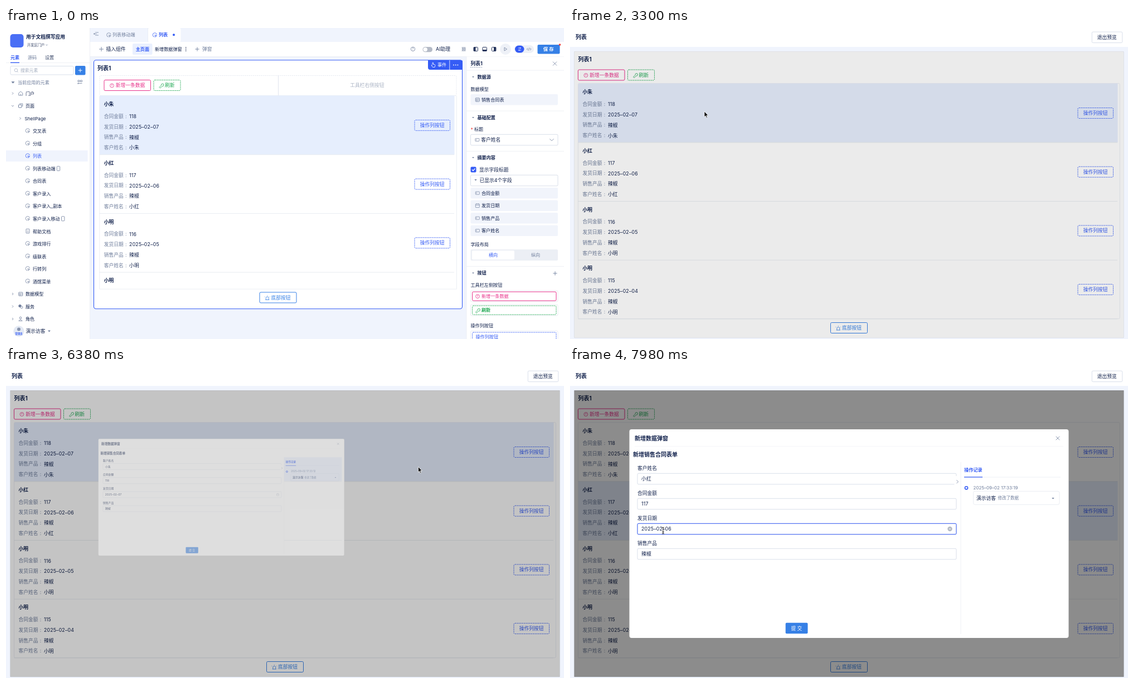
Animation, 1001 px wide and 559 px high, one loop 8 s. Source, as an HTML page:

```html
<!DOCTYPE html>
<html lang="zh-CN">
<head>
<meta charset="utf-8">
<style>
html, body { margin: 0; width: 100%; height: 100%; overflow: hidden; background: #fff }
svg { display: block; font-family: Inter, 'Noto Sans CJK SC', 'Noto Sans CJK', sans-serif }
text { white-space: pre }
</style>
</head>
<body>
<svg id="stage" width="1001" height="559" viewBox="0 0 1001 559"></svg>
<script>
const INK = '#10204b', GREY = '#6f7e9c', BLUE = '#355cf5', SKY = '#3680e6', PINK = '#e8318a',
  GREEN = '#1aa64f', EDGE = '#d9dfea', FAINT = '#eaedf3', PALE = '#f1f4fb', BACK = '#f0f4fd', PICK = '#e6eefd';
const ACCOUNT = '演示访客';

// Drawing helpers; y of text is its vertical middle
const text = (x, y, s, size = 8.125, color = INK, weight = 400, more = '') =>
  `<text x="${x}" y="${y + size * .365}" font-size="${size}" fill="${color}" font-weight="${weight}" ${more}>${s}</text>`;
const rect = (x, y, w, h, fill = 'none', stroke = 'none', r = 2, more = '') =>
  `<rect x="${x}" y="${y}" width="${w}" height="${h}" rx="${r}" fill="${fill}" stroke="${stroke}" ${more}/>`;
const path = (d, color = GREY, width = .8, fill = 'none', more = '') =>
  `<path d="${d}" stroke="${color}" stroke-width="${width}" fill="${fill}" ${more}/>`;
const dot = (x, y, r, fill, stroke = 'none', width = .8) =>
  `<circle cx="${x}" cy="${y}" r="${r}" fill="${fill}" stroke="${stroke}" stroke-width="${width}"/>`;
const group = (id, body, more = '') => `<g id="${id}" ${more}>${body}</g>`;
const line = (x1, y1, x2, y2, color = FAINT, width = .8) => path(`M${x1} ${y1}L${x2} ${y2}`, color, width);
const plus = (x, y, r, color = GREY) => path(`M${x - r} ${y}h${2 * r}M${x} ${y - r}v${2 * r}`, color, .9);
const cross = (x, y, r) => path(`M${x - r} ${y - r}l${2 * r} ${2 * r}m0 ${-2 * r}l${-2 * r} ${2 * r}`, GREY, .8);
const right = (x, y, r = 2) => path(`M${x - r / 2} ${y - r}l${r} ${r}l${-r} ${r}`);
const down = (x, y, r = 2) => path(`M${x - r} ${y - r / 2}l${r} ${r}l${r} ${-r}`);
const wedge = (x, y, r = 2) => path(`M${x - r} ${y - r / 2}h${2 * r}l${-r} ${r * 1.2}z`, 'none', 0, GREY);
const DASH = 'stroke-dasharray="2.1 1.1" stroke-width=".9"';
const WIDE = 'letter-spacing=".2"';

const powerIcon = (x, y) => dot(x, y, 3.4, 'none', PINK) + line(x, y - 2.2, x, y + .6, PINK);
const toolIcon = (x, y) => path(`M${x - 3.5} ${y + 3.5}l3.6 -3.6a2.2 2.2 0 1 1 1.6 1.6l-3.6 3.6z`, GREEN);
const bellIcon = (x, y) => path(`M${x - 3.5} ${y + 3}h7M${x - 2.5} ${y + 3}v-3a2.5 2.5 0 0 1 5 0v3M${x} ${y - 4}v-1M${x - 4} ${y - 2}l-.8 -.8M${x + 4} ${y - 2}l.8 -.8`, SKY);
const pageIcon = (x, y, c = GREY) => path(`M${x + 3.6} ${y - .5}a3.7 3.7 0 1 0 -4 4.1M${x} ${y}l3.8 1.3l-1.8 .7l-.7 1.8z`, c, .75);
const boxIcon = (x, y) => rect(x - 3.5, y - 2.5, 7, 5, 'none', GREY, .6, 'stroke-width=".7"') + line(x - 1.7, y - 1, x - 1.7, y + 1, GREY);
const gridIcon = (x, y) => rect(x - 3.5, y - 3, 7, 6.4, 'none', GREY, .6, 'stroke-width=".8"') +
  path(`M${x - 3.5} ${y - .9}h7M${x - 3.5} ${y + 1.2}h7M${x - 1} ${y - 1}v4.3`, GREY, .6);
const dateIcon = (x, y) => rect(x - 3.5, y - 3, 7, 6.4, 'none', GREY, .6, 'stroke-width=".7"') +
  path(`M${x - 3.5} ${y - .7}h7M${x - 1.5} ${y - 4}v2M${x + 1.5} ${y - 4}v2`, GREY, .6);
const phoneIcon = (x, y) => rect(x - 2.5, y - 4, 5.4, 8, 'none', GREY, 1, 'stroke-width=".8"');

// The record list shared by editor and preview
const PITCH = 105.7;
const records = [['小朱', 118, '07'], ['小红', 117, '06'], ['小明', 116, '05'], ['小明', 115, '04']]
  .map(([name, sum, day]) => ({ name, values: [sum, '2025–02–' + day, '辣椒', name] }));
const labels = ['合同金额', '发货日期', '销售产品', '客户姓名'];

const listHead = (x, y) =>
  rect(x + .5, y + .5, 83.5, 19, 'none', PINK, 2) + powerIcon(x + 14.5, y + 10.5) + text(x + 21.2, y + 10, '新增一条数据', 8.75, PINK) +
  rect(x + 89.5, y + .5, 48, 19, 'none', GREEN, 2, DASH) + toolIcon(x + 103, y + 10) + text(x + 109.5, y + 10, '刷新', 8.75, GREEN, 500);

const listRows = (x, y, width, pick) => {
  const frame = rect(x + .3, y, width, 423, 'none', FAINT, 2);
  const chosen = rect(x + .5, y, width - 4, 106, PICK, 'none', 0, `id="${pick}"`);
  return frame + chosen + records.map((rec, i) => {
    const top = y + i * PITCH, bx = x + width - 75;
    return text(x + 8.3, top + 15.6, rec.name, 8.75, INK, 700) +
      labels.map((label, k) => {
        const ly = top + 37.2 + k * 18.75;
        return text(x + 8.3, ly, label, 8.75, GREY) + text(x + 46.5, ly, ':', 8.75, GREY) +
          text(x + 53.6, ly + .3, rec.values[k], 8.75, INK, 400, WIDE);
      }).join('') +
      rect(bx, top + 43.9, 63.5, 19, 'none', BLUE, 2, DASH) + text(bx + 9.8, top + 53.2, '操作列按钮', 8.75, BLUE) +
      line(x, top + 106.2, x + width - 4, top + 106.2, '#e3e7ee');
  }).join('');
};
const bottomButton = (x, y) =>
  rect(x + .5, y + .5, 66, 19, '#fff', SKY, 2) + bellIcon(x + 14.3, y + 11) + text(x + 21, y + 10, '底部按钮', 8.75, SKY);

const sidebar = () => {
  const pages = ['交叉表', '分组', '列表', '列表移动端', '合同表', '客户录入', '客户录入_副本', '客户录入移动', '帮助文档', '游戏排行', '级联表', '行转列', '酒馆菜单'];
  let s = rect(0, 0, 150.5, 559, '#fff', 'none', 0) + line(150.5, 0, 150.5, 559) +
    rect(7.5, 11, 24, 24, '#4a6ff5', 'none', 5) +
    text(36, 16, '用于文档撰写应用', 8.75, INK, 700) + text(38, 31, '开发区门户', 6.25, '#3c4a6b') + down(73, 30.5, 1.6) +
    text(8, 53.5, '元素', 8.125, BLUE, 700) + text(39, 53.5, '源码', 8.125, GREY) + text(70, 53.5, '设置', 8.125, '#3c4a6b') +
    line(0, 62.5, 150, 62.5) + line(8, 62.3, 24, 62.3, BLUE, 1.4) +
    rect(8, 68.5, 113, 15.5, '#fff', EDGE) + dot(18, 75.8, 2.8, 'none', '#a9b3c6') + line(20, 78, 21.6, 79.6, '#a9b3c6') +
    text(26, 76, '搜索元素', 7.8, '#a3adbf') + rect(124, 68, 18.5, 16.5, SKY) + plus(133.2, 76.2, 3.4, '#fff') +
    wedge(12.5, 97.7, 3) + text(21, 98, '当前应用的元素', 8.125, GREY) +
    path('M129 94h3v2.6h-3zM133.5 94h3v2.6h-3zM129 99.5h7.5M130 98.5l-1.5 1.2l1.5 1.2', GREY, .8) +
    rect(0, 220, 146.5, 20, BACK, 'none', 0);
  [['门户', 117.5], ['页面', 140], ['数据模型', 478], ['服务', 500.5], ['角色', 523]].forEach(([name, y], i) => {
    s += (i == 1 ? down : right)(12, y, 2) + text(35, y + .3, name, 8.125, INK, 500);
    s += [() => path(`M22.8 ${y - .5}l3.5 -3l3.5 3v4h-7zM26.3 ${y + 1}v2.5`),
      () => rect(22.5, y - 2, 5.5, 5, 'none', GREY, .6) + path(`M24 ${y - 4}h5.8v5`),
      () => gridIcon(26.3, y), () => dot(25, y - 1, 2.6, GREY) + dot(28, y + 1.5, 2, '#fff', GREY),
      () => dot(26, y - 2, 1.8, 'none', GREY) + path(`M22.5 ${y + 3.5}h7M23.5 ${y + 3}q2.5 -4 5 0`)][i]();
  });
  s += right(25.5, 162.5, 2) + text(33.5, 162.7, 'ShellPage', 8.125);
  pages.forEach((name, i) => {
    const y = 185 + i * 22.53, on = i == 2;
    s += (i == 8 ? rect(36, y - 4, 6, 7.6, 'none', GREY, .6, 'stroke-width=".8"') + path(`M37.5 ${y - .5}h3M37.5 ${y + 1.5}h3`, GREY, .6)
      : pageIcon(39, y - .4, on ? BLUE : GREY)) + text(48, y + .3, name, 8.125, on ? BLUE : INK, on ? 500 : 400);
    if (i == 3) s += phoneIcon(93.8, y);
    if (i == 7) s += phoneIcon(102, y);
  });
  return s + rect(0, 533, 150, 26, '#fff', 'none', 0) + dot(23, 545, 9.7, '#e3e9f4') +
    dot(23, 541.5, 3, '#8793ab') + text(16.5, 549.5, '管理员', 4.4, BLUE, 700) +
    text(35.5, 544.8, ACCOUNT, 8.75) + wedge(77.5, 544.8, 2.4);
};

const topBars = () => rect(151, 0, 850, 25, BACK, 'none', 0) + rect(255, 0, 58.5, 25, '#fff', 'none', 2) +
  rect(151, 25, 850, 26.5, '#fff', 'none', 0) + line(151, 51.5, 1001, 51.5) + line(254.5, 0, 254.5, 25) +
  path('M160 8h6M160 13h6M157.5 10.5h5M159 9l-1.7 1.5l1.7 1.5') +
  pageIcon(184.5, 12.5) + text(191, 12.3, '列表移动端', 8.125, GREY) +
  pageIcon(267, 12.5, BLUE) + text(274, 12.3, '列表', 8.125, BLUE, 700) + dot(301, 12.3, 2, BLUE) +
  plus(171, 38, 4) + text(179.5, 38.3, '插入组件', 8.75) +
  rect(227, 28, 35.5, 20, '#eaf0fe') + text(232.7, 38.2, '主页面', 8.125, BLUE, 700) +
  text(267, 38.2, '新增数据弹窗', 8.125) + [35, 38, 41].map(y => dot(322.7, y, .8, INK)).join('') +
  plus(343, 38, 3.6) + text(352, 38.2, '弹窗', 8.75, GREY) +
  dot(730, 37.8, 3.7, 'none', GREY) + text(728.4, 37.8, '?', 5.5, GREY) +
  rect(747.5, 34, 17.5, 9.3, '#b4bac6', 'none', 4.6) + dot(752.2, 38.6, 3.7, '#fff') + text(771, 38.2, 'AI助理', 8.75) +
  path('M817.5 35h7M817.5 41h7M818.5 36.5h2v3h-2zM822 36.5h2v3h-2z') +
  [839, 855, 871.5].map((x, i) => rect(x, 34.5, 7.4, 7, '#fff', '#26355c', 1) +
    [rect(x, 34.5, 3.5, 7, '#26355c', 'none', 0), rect(x, 39, 7.4, 2.5, '#26355c', 'none', 0), rect(x + 3.5, 34.5, 4, 7, '#26355c', 'none', 0)][i]).join('') +
  group('play', dot(896, 38, 10, '#eef1f7') + path('M894 35l4.6 3l-4.6 3z', GREY)) +
  rect(912, 31, 35, 14, '#eef1f7', 'none', 7) + rect(913, 31.5, 16.5, 13, BLUE, 'none', 6.5) +
  path('M919 36h5M919 39.8h5M922.5 35v2M920.5 38.8v2', '#fff') +
  path('M936.3 36l-2 2l2 2M940 36l2 2l-2 2M938.8 35.5l-1.3 5', GREY, .8) +
  rect(953.5, 30, 40, 16.5, SKY) + text(963.8, 38.3, '保 存', 8.4, '#fff', 700) + dot(993.5, 30, 1.8, '#f0413c');

const sidePanel = () => {
  const field = (y, name, icon) => rect(833.5, y - 9.8, 156.5, 19.5, PALE) + icon(845.8, y) + text(853, y + .2, name);
  const heading = (y, name) => wedge(838, y, 1.8) + text(845.5, y, name, 8.125, INK, 700);
  const small = (y, name) => text(833.5, y, name);
  const slot = y => rect(833.5, y, 156.5, 20, '#fff', FAINT);
  return rect(826, 51.5, 175, 508, '#fff', 'none', 0) + line(826, 51.5, 826, 559) +
    text(833.5, 63.5, '列表1', 8.75, INK, 700) + path('M833 70.5h22', GREY, .7, 'none', 'stroke-dasharray="2 1.2"') + cross(984.5, 64, 3.5) +
    [76, 149, 221.5, 428.5].map(y => line(826, y, 1001, y)).join('') +
    heading(88, '数据源') + small(110, '数据模型') + field(128.8, '销售合同表', gridIcon) +
    heading(161, '基础配置') + text(833.5, 182.5, '*', 8.75, '#f0413c') + text(840, 182, '标题') +
    rect(833.5, 191.3, 156.5, 19.5, '#fff', EDGE) + boxIcon(845.3, 201) + text(852.2, 201.2, '客户姓名', 8.75) + down(979, 201, 3.6) +
    heading(233, '摘要内容') + rect(833.5, 249.5, 10, 10, BLUE) + path('M836 254.5l2 2l3.5 -4', '#fff', 1.2) + text(849, 254.8, '显示字段标题', 8.75) +
    rect(833.5, 264.3, 156.5, 19.5, '#fff', EDGE) + wedge(842.5, 273, 2.2) + text(849.5, 274, '已显示4个字段', 8.75) +
    labels.map((name, i) => field(296.7 + i * 22.5, name, i == 1 ? dateIcon : boxIcon)).join('') +
    small(389.3, '字段布局') + rect(833.5, 398, 156.5, 20, '#eceff5') + rect(836, 400, 76, 16.3, '#fff') +
    text(866, 408, '横向', 8.125, BLUE) + text(942, 408, '纵向', 8.125, GREY) +
    heading(440.5, '按钮') + plus(985, 441, 3.6) + small(462.5, '工具栏左侧按钮') +
    slot(472) + rect(836.5, 474.2, 150.5, 16, '#fff', PINK) + powerIcon(846, 482.3) + text(853, 482.3, '新增一条数据', 8.125, PINK) +
    slot(497) + rect(836.5, 499.2, 150.5, 16, '#fff', GREEN, 2, DASH) + toolIcon(846, 507.3) + text(853, 507.3, '刷新', 8.125, GREEN, 700) +
    small(535, '操作列按钮') + slot(544.5) + rect(836.5, 547, 150.5, 16, '#fff', BLUE, 2, DASH) + text(842.5, 555.5, '操作列按钮', 8.125, BLUE);
};

const editor = () => rect(0, 0, 1001, 559, BACK, 'none', 0) + sidebar() + topBars() + sidePanel() +
  rect(157.5, 57.8, 661, 447, '#fff', BLUE, 4, 'stroke-width="1.1"') + text(164, 72, '列表1', 10, INK, 700) +
  path('M757 58h60a2 2 0 0 1 2 2v15h-58a4 4 0 0 1 -4 -4z', 'none', 0, BLUE) + line(795.8, 58, 795.8, 75, '#fff') +
  path('M765 65.5v-3q1 -1 1.6 0v3h2.5q1.2 .5 .7 2.5l-.8 2.5h-3.5l-2.5 -3.5q.8 -1 2 .2', '#fff', .8) +
  text(774, 66.5, '事件', 8.125, '#fff', 500) + [803, 806.7, 810.4].map(x => dot(x, 66.5, .9, '#fff')).join('') +
  rect(168, 85.5, 640, 36, 'none', EDGE, 2, 'stroke-dasharray="2 1.5" stroke-width=".7"') + line(488.5, 85.5, 488.5, 121, EDGE) +
  listHead(175.5, 93) + text(617.3, 103.3, '工具栏右侧按钮', 8.75, '#aab3c4') +
  `<clipPath id="cut"><rect x="160" y="120" width="655" height="349.5"/></clipPath>` +
  group('rows', listRows(167.5, 121.5, 640.5, 'pickA'), 'clip-path="url(#cut)"') + line(168, 469.3, 808, 469.3) +
  bottomButton(454.5, 474.5) +
  group('tip', rect(869, 4, 54, 21, '#333336', 'none', 3) + path('M893 25h6l-3 3z', 'none', 0, '#333336') + text(873.8, 14.5, '保存并预览', 8.75, '#fff')) +
  group('toast', rect(469, 0, 63, 22, '#fff', '#eceef2', 4) + dot(480, 11, 3, 'none', BLUE) + text(487.5, 11, '提交中...', 8.75));

const preview = () => rect(0, 0, 1001, 559, BACK, 'none', 0) + rect(0, 0, 1001, 34, '#fff', 'none', 0) +
  text(10, 16.5, '列表', 10, INK, 700) + rect(936.3, 7, 54.5, 19.5, '#fff', EDGE) + text(945.8, 16.8, '退出预览', 8.75) +
  rect(7.5, 42, 986, 515, '#fff', EDGE, 2, 'stroke-width=".5"') + text(14.5, 56.5, '列表1', 10, INK, 700) + listHead(14, 74.5) +
  listRows(14.3, 99.6, 971.7, 'pickB') + bottomButton(467, 529) +
  path('M107 112H895V487H107ZM702 171V480H887V171Z', 'none', 0, '#fff', 'id="cover" fill-rule="evenodd"') +
  rect(7.5, 42, 986, 515, '#000', 'none', 0, 'id="mask"') + group('modal', modal());

const modal = () => rect(106.5, 112, 788, 375, '#fff', 'none', 4) + text(116, 128.3, '新增数据弹窗', 10, INK, 700) + cross(875, 128, 3.3) +
  line(116, 142.7, 885, 142.7, '#f1f3f6') + text(113, 157.8, '新增销售合同表单', 10, INK, 700) +
  ['客户姓名', ...labels.slice(0, 3)].map((name, i) => {
    const y = 182 + i * 45;
    return text(121, y, name, 8.75, INK, 500) + rect(121, y + 9.3, 572, 19.5, '#fff', EDGE) +
      rect(121, y + 9.3, 572, 19.5, 'none', BLUE, 2, `id="ring${i}"`) + text(128, y + 19.1, '', 8.75, INK, 400, `id="value${i}" ${WIDE}`);
  }).join('') +
  group('calendar', dateIcon(681.5, 291.2), 'opacity=".6"') +
  group('clear', dot(681.5, 291, 4.2, '#b3b9c4') + path('M680 289.5l3 3m0 -3l-3 3', '#fff')) +
  rect(689.5, 196, 11.5, 20, '#fff', 'none', 2) + right(695, 206.2, 3) + line(701, 171, 701, 480) +
  text(707.3, 185, '操作记录', 8.125, BLUE, 700) + line(707, 198, 880, 198) + line(707, 197.8, 740, 197.8, BLUE, 1.3) +
  dot(711, 217.3, 2.6, '#fff', BLUE, 1.6) + text(723.5, 216.8, '', 8, GREY, 400, 'id="stamp"') +
  rect(723.5, 223.3, 154.5, 24, '#fff', FAINT, 3) + text(729, 235.5, ACCOUNT, 8.75, INK, 500) +
  text(767.5, 235.7, '修改了数据', 7.5, GREY) + wedge(866.5, 236, 2.2) +
  rect(386.7, 459.7, 39.8, 19.6, SKY) + text(396.5, 469.5, '提 交', 8.75, '#fff', 500);

const cursors = group('arrow', path('M0 0v9.8l2.2 -2l1.6 3.6l1.6 -.7l-1.6 -3.5h3z', '#fff', .8, '#000')) +
  group('hand', path('M-1.5 3v-5.5q1 -1.2 2 0v3.5l4.5 1.2q1 .8 .4 3l-.9 3.3h-4.5l-3.6 -4.5q.2 -1.4 2.1 -.1z', '#000', .9, '#fff')) +
  group('beam', path('M-2 -6q2 0 2 1.5v9q0 1.5 -2 1.5M2 -6q-2 0 -2 1.5M0 4.5q0 1.5 2 1.5M-1.5 2.5h3', '#111', .9));

const stage = document.getElementById('stage');
stage.innerHTML = group('editor', editor()) + group('preview', preview()) + group('cursor', cursors);
const el = {};
stage.querySelectorAll('[id]').forEach(node => el[node.id] = node);
const set = (id, name, value) => el[id].setAttribute(name, value);
const show = (id, on) => set(id, 'display', on ? 'inline' : 'none');

const clamp = v => Math.min(1, Math.max(0, v));
const bezier = (x1, y1, x2, y2) => v => {
  const at = (a, b, u) => 3 * (1 - u) ** 2 * u * a + 3 * (1 - u) * u * u * b + u ** 3;
  let lo = 0, hi = 1;
  for (let i = 0; i < 24; i++) {
    const mid = (lo + hi) / 2;
    if (at(x1, x2, mid) < clamp(v)) lo = mid; else hi = mid;
  }
  return at(y1, y2, lo);
};
const outCirc = bezier(.08, .82, .17, 1), inOutCirc = bezier(.78, .14, .15, .86);

// Pointer stops: time, x, y
const stops = [[250, 724, -14], [400, 765, 5], [620, 865, 30], [850, 896, 40], [1850, 896, 40], [2080, 700, 66], [2290, 540, 86],
  [2450, 540, 86], [2700, 340, 130], [3010, 241, 150], [3480, 241, 150], [4080, 330, 187], [4500, 318, 245], [4900, 290, 300],
  [5220, 113, 363], [5420, 590, 304], [5740, 847, 141], [5980, 874, 127], [6260, 874, 127], [6380, 741, 179], [6600, 420, 245],
  [6820, 257, 270], [7300, 257, 270], [7820, 178, 262], [7860, 172, 283], [7980, 167, 294]];
const pointer = t => {
  const i = stops.findIndex(s => s[0] > t);
  if (i == 0) return stops[0].slice(1);
  if (i < 0) return stops[stops.length - 1].slice(1);
  const [t0, x0, y0] = stops[i - 1], [t1, x1, y1] = stops[i], k = (t - t0) / (t1 - t0);
  return [x0 + (x1 - x0) * k, y0 + (y1 - y0) * k];
};
const over = (t, i) => {
  const [x, y] = pointer(t), top = 191 + i * 45;
  return (t > 3500 && t < 6260 || t > 7300) && x > 121 && x < 693 && y > top && y < top + 20;
};
const glow = (t, i) => [0, 20, 40, 60, 80, 100].filter(d => over(t - d, i)).length / 6;

const SWAP = 1900, SECOND = 7002, CLOSE = 6284;
function draw(t) {
  const second = t >= SECOND, start = second ? SECOND : 3266, closing = !second && t >= CLOSE;
  show('editor', t < SWAP);
  show('preview', t >= SWAP);
  const hint = clamp((t - 1050) / 220);
  set('tip', 'opacity', hint);
  set('play', 'opacity', 1 - hint);
  const slide = clamp((t - 1570) / 220);
  set('toast', 'opacity', Math.sqrt(slide));
  set('toast', 'transform', `translate(0 ${-15 + 20 * slide})`);

  const fade = closing ? 1 - clamp((t - CLOSE) / 200) : clamp((t - start) / 200);
  const zoom = closing ? 1 - inOutCirc((t - CLOSE) / 200) : outCirc((t - start - 65) / 200);
  const [ox, oy] = second ? [256, 270] : [241, 151], scale = .2 + .8 * zoom;
  set('mask', 'opacity', .45 * fade);
  for (const id of ['modal', 'cover']) {
    show(id, zoom > .001);
    set(id, 'opacity', id == 'modal' ? zoom : clamp(zoom * 4));
    set(id, 'transform', `translate(${ox} ${oy}) scale(${scale}) translate(${-ox} ${-oy})`);
  }
  set('pickB', 'transform', `translate(0 ${second ? PITCH : 0})`);
  const rec = records[+second];
  [rec.name, ...rec.values.slice(0, 3)].forEach((value, i) => {
    el['value' + i].textContent = value;
    set('ring' + i, 'opacity', glow(t, i));
  });
  el.stamp.textContent = '2025–09–02 17:33:' + (second ? 19 : 12);
  show('clear', over(t, 2));
  show('calendar', !over(t, 2));

  const [x, y] = pointer(t), hand = t > 790 && t < SWAP - 40 || t > 5940 && t < 6290;
  const beam = !hand && [0, 1, 2, 3].some(i => over(t, i));
  set('cursor', 'transform', `translate(${x} ${y})`);
  show('hand', hand);
  show('beam', beam);
  show('arrow', !hand && !beam);
}
(function tick() {
  draw(performance.now() % 8000);
  requestAnimationFrame(tick);
})();
</script>
</body>
</html>
```
